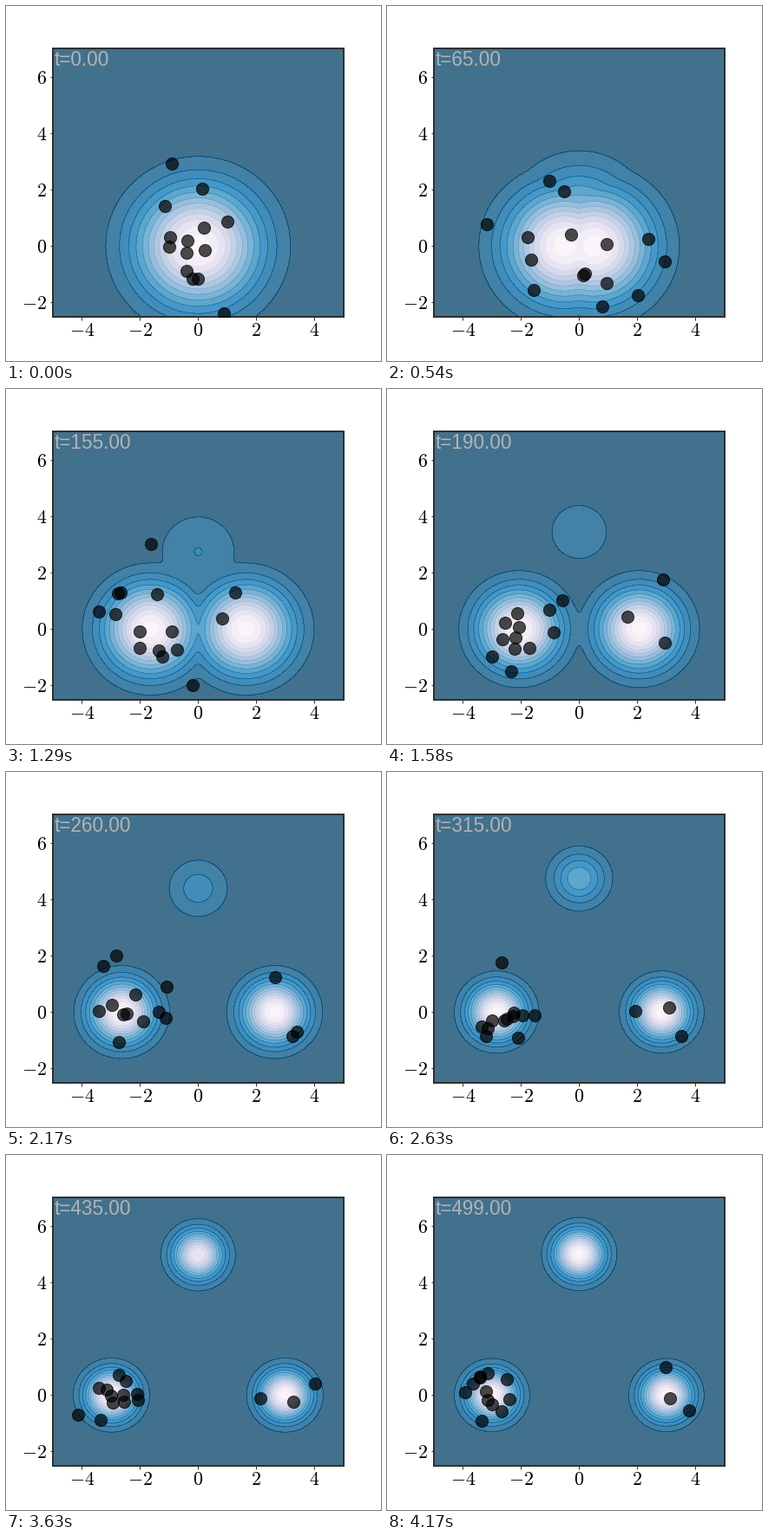
Recreate the animation shown at these times as a matplotlib script. Size 432 by 410 pixels, loop 4.21 s.

```python
import matplotlib.pyplot as plt
import numpy as np
from matplotlib.animation import FuncAnimation

W, H, DPI = 432, 410, 72
STEPS, LOOP_MS = 101, 4210
T_MAX = 499
VAR0, VAR1 = 2.0, 1 / 3
MODES = np.array([(-3, 0), (3, 0), (0, 5)])
N_LEFT, N_RIGHT = 12, 3
LEVELS = np.arange(14) * 0.08

plt.rcParams.update({"mathtext.fontset": "cm", "axes.linewidth": 2,
                     "axes.edgecolor": "#303030"})


def clock(k):
    return np.minimum(5 * k, T_MAX)


def anneal(t):
    """Logistic ramp from 0 to 1."""
    return 0.5 + 0.5 * np.tanh(4 * (t / T_MAX - 0.5)) / np.tanh(2)


gx, gy = np.meshgrid(np.linspace(-5, 5, 220), np.linspace(-2.5, 7, 210))
log_start = -(gx**2 + gy**2) / (2 * VAR0)
log_end = np.logaddexp.reduce(
    [-((gx - mx)**2 + (gy - my)**2) / (2 * VAR1) for mx, my in MODES])


def density(t):
    """Geometric path between the wide Gaussian and the mixture."""
    b = anneal(t)
    logp = (1 - b) * log_start + b * log_end
    return np.exp(logp - logp.max())


def particle_paths(rho=0.85, seed=4):
    """Noisy walks that relax towards the two lower modes as they drift apart."""
    rng = np.random.default_rng(seed)
    home = MODES[[0] * N_LEFT + [1] * N_RIGHT]
    x = rng.normal(scale=(0.6, 1.3), size=home.shape)
    paths = [x]
    for k in range(1, STEPS):
        b = anneal(clock(k))
        var = 1 / (b / VAR1 + (1 - b) / VAR0)
        centre = home * b / VAR1 * var
        kick = np.sqrt((1 - rho**2) * var) * rng.normal(size=x.shape)
        x = centre + rho * (x - centre) + kick
        paths.append(x)
    return paths


paths = particle_paths()

fig = plt.figure(figsize=(W / DPI, H / DPI), dpi=DPI, facecolor="white")
ax = fig.add_axes([0.125, 0.125, 0.775, 0.755])
ax.set(xlim=(-5, 5), ylim=(-2.5, 7), xticks=range(-4, 5, 2), yticks=range(-2, 7, 2))
for axis in (ax.xaxis, ax.yaxis):
    axis.set_major_formatter(lambda v, pos: f"${v:g}$")
ax.tick_params(labelsize=22)
ax.tick_params(axis="x", pad=2.5)

dots = ax.scatter(*paths[0].T, s=200, c="black", alpha=0.7, zorder=3)
label = ax.text(56, 341, "", transform=None, family="Liberation Sans",
                size=22.5, color="#b3b3b3", zorder=4)
layers = []


def draw(tick):
    # Two ticks per step, the first half a step early.
    k = min((tick + 1) // 2, STEPS - 1)
    t = clock(k)
    while layers:
        layers.pop().remove()
    z = density(t)
    layers.append(ax.contourf(gx, gy, z, LEVELS, cmap="PuBu_r", alpha=0.75))
    layers.append(ax.contour(gx, gy, z, LEVELS, cmap="PuBu_r", linewidths=0.6))
    dots.set_offsets(paths[k])
    label.set_text(f"t={t:.2f}")
    return [*layers, dots, label]


anim = FuncAnimation(fig, draw, frames=2 * STEPS, init_func=lambda: [],
                     interval=LOOP_MS / (2 * STEPS), repeat=True, repeat_delay=0)
plt.show()
```
